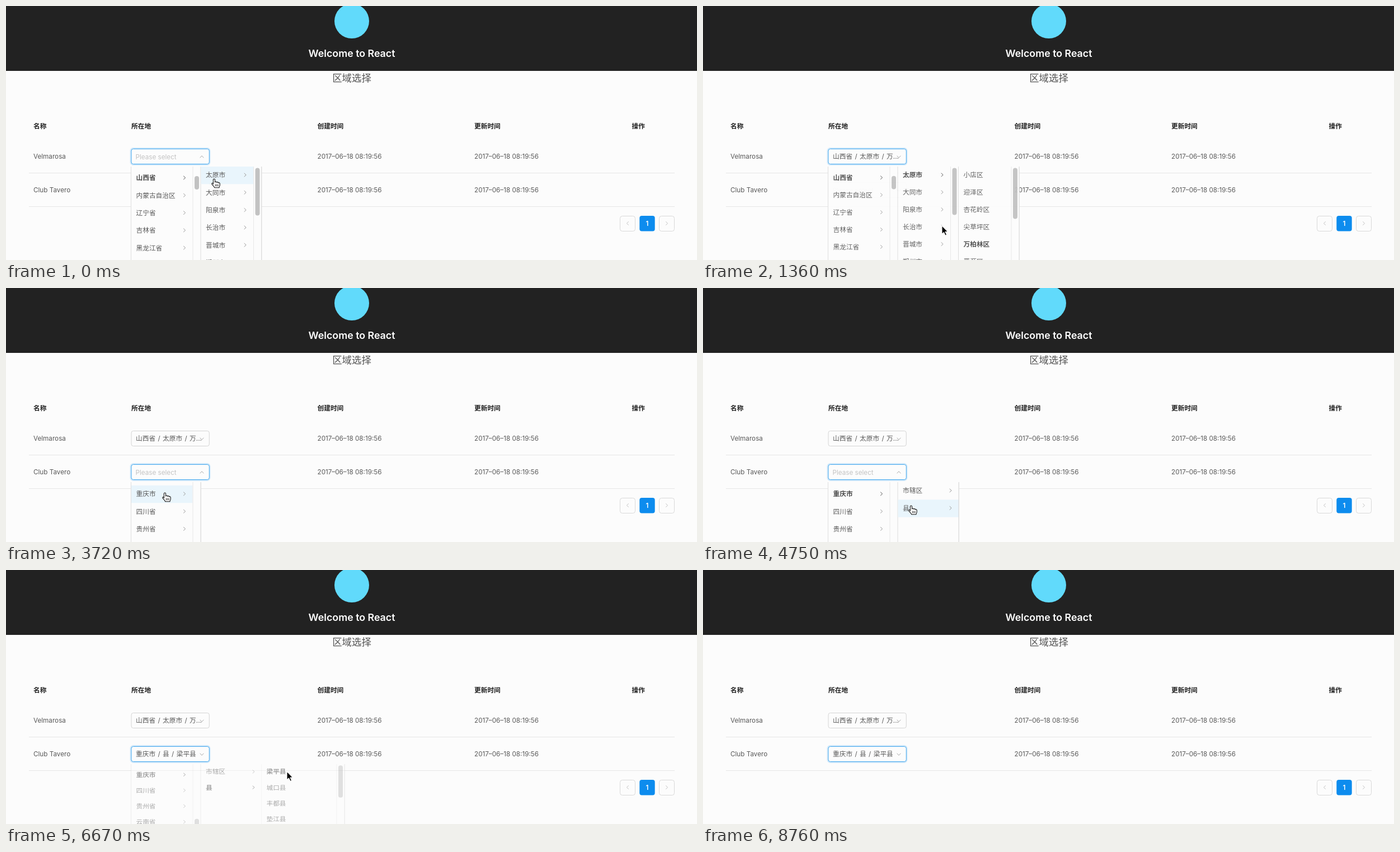
An HTML page for the animation above (8860 ms loop, 1235x454 px).

```html
<!DOCTYPE html>
<html lang="zh">
<head>
<meta charset="utf-8">
<title>区域选择</title>
<style>
  html, body { margin: 0; width: 100%; height: 100%; overflow: hidden; background: #fcfcfc; }
  svg { display: block; width: 1235px; height: 454px; }
  text { font: 11.7px Inter, "Noto Sans CJK SC", "Noto Sans CJK", sans-serif; fill: #595959; white-space: pre; }
  .b { font-weight: 600; fill: #4a4a4a; }
  .th { font-weight: 600; fill: #222; }
  .ph { fill: #c3c3c3; }
  .val { word-spacing: 1.1px; }
</style>
</head>
<body>
<svg viewBox="0 0 1235 454">
  <defs>
    <clipPath id="menuClip"><rect x="220" y="0" width="400" height="188"/></clipPath>
    <g id="arrow">
      <path d="M0 0V15.2L3.5 12L6.1 17.6L8.6 16.5L6.1 11H10.8Z" fill="#000" stroke="#fff" stroke-width="1.1" stroke-linejoin="round"/>
    </g>
    <g id="hand" stroke="#111" stroke-width="1.1" stroke-linejoin="round" stroke-linecap="round">
      <path fill="#fff" d="M-1.6 9.4V1.6C-1.6 -.6 1.5 -.6 1.5 1.6V6C2.2 4.6 4.5 4.7 4.8 6.4C5.5 5.2 7.4 5.5 7.6 7.1C8.4 6.2 10.2 6.7 10.2 8.6V11.2C10.2 13 8.9 13.8 8.9 15.8H.6C.3 13.6 -1.8 12.6 -3.9 9.6C-5 7.8 -3 6.8 -1.6 8.4"/>
      <path d="M2.4 10V13M4.7 10V13M7 10V13" fill="none" stroke-width=".9"/>
    </g>
  </defs>
  <g id="back"></g>
  <g id="page"></g>
  <g id="live"></g>
</svg>
<script>
const LOOP = 8860;
const $ = id => document.getElementById(id);
const clamp = v => Math.max(0, Math.min(1, v));
const ramp = (t, a, b) => clamp((t - a) / (b - a));

const rect = (x, y, w, h, fill, more = '') =>
  `<rect x="${x}" y="${y}" width="${w}" height="${h}" fill="${fill}" ${more}/>`;
const label = (x, y, s, cls = '', more = '') =>
  `<text x="${x}" y="${y}" class="${cls}" ${more}>${s}</text>`;
const stroke = (d, color, w = 1) =>
  `<path d="${d}" fill="none" stroke="${color}" stroke-width="${w}"/>`;
const chevron = (x, y, dir, color) => stroke({
  right: `M${x - 1.8} ${y - 3.2}l3.4 3.2l-3.4 3.2`,
  left: `M${x + 1.8} ${y - 3.2}l-3.4 3.2l3.4 3.2`,
  up: `M${x - 3.3} ${y + 1.8}l3.3 -3.6l3.3 3.6`,
  down: `M${x - 3.3} ${y - 1.8}l3.3 3.6l3.3 -3.6`
}[dir], color);

// The screen refreshes in steps of roughly 150 ms: [step, time] anchors.
const TICKS = [[0, 0], [1, 140], [7, 1060], [15, 2250], [23, 3420], [31, 4610],
  [39, 5780], [47, 6970], [54, 8010], [59, 8760], [60, LOOP]];
const SLACK = 0.08; // steps are uneven by a few ms
function snap(t) {
  const i = TICKS.findIndex(p => p[1] > t);
  const [k0, t0] = TICKS[i - 1], [k1, t1] = TICKS[i];
  const step = (t1 - t0) / (k1 - k0);
  return (t0 + Math.floor((t - t0) / step + SLACK) * step) % LOOP;
}

// Pointer tip: time, x, y
const PATH = [[0, 372, 309], [300, 372, 309], [740, 488, 424], [1210, 484, 424],
  [1360, 426, 392], [1660, 330, 336], [1960, 313, 326], [2690, 313, 326],
  [2980, 287, 367], [3720, 284, 366], [4200, 284, 366], [4640, 372, 389],
  [5200, 372, 389], [5630, 499, 364], [6520, 502, 362], [6670, 502, 360],
  [7110, 502, 360], [7860, 686, 408], [LOOP, 686, 408]];
function pointer(t) {
  t = Math.max(0, t);
  const i = Math.max(1, PATH.findIndex(p => p[0] >= t));
  const a = PATH[i - 1], b = PATH[i], u = ramp(t, a[0], b[0]);
  return { x: a[1] + (b[1] - a[1]) * u, y: a[2] + (b[2] - a[2]) * u };
}

const PICK1 = 300, CLOSE1 = 1244, OPEN2 = 2690, PICK2 = 4200, PICK3 = 5050, CLOSE2 = 6498;
const ITEM = 31.3, THUMB = 0.163;
const list = s => s.split(' ');
const PROVINCES = list('北京市 天津市 河北省 山西省 内蒙古自治区 辽宁省 吉林省 黑龙江省 上海市 江苏省 浙江省 安徽省 福建省 江西省 山东省 河南省 湖北省 湖南省 广东省 广西壮族自治区 海南省 重庆市 四川省 贵州省 云南省 西藏自治区 陕西省 甘肃省');
const SHANXI = list('太原市 大同市 阳泉市 长治市 晋城市 朔州市 晋中市');
const TAIYUAN = list('小店区 迎泽区 杏花岭区 尖草坪区 万柏林区 晋源区 清徐县');
const COUNTIES = list('梁平县 城口县 丰都县 垫江县 武隆县 忠县 开县');

function column(c, top, mouse) {
  const { x, end, items, active, scroll = 0, thumb, leaf } = c;
  const body = thumb ? end - 14.5 : end;
  let out = rect(x, 0, end - x, 188, '#fcfcfc');
  items.forEach((name, i) => {
    const y = i * ITEM - scroll;
    if (y < -ITEM || y > 188) return;
    const over = mouse && mouse.x >= x && mouse.x < body &&
      mouse.y - top >= Math.max(0, y) && mouse.y - top < y + ITEM;
    if (over) out += rect(x, y, body - x, ITEM, '#e9f5fc');
    const on = i === active;
    out += label(x + 8.5, y + 19.4, name, on ? 'b' : '');
    if (!leaf) out += chevron(body - 14.5, y + 15, 'right', on ? '#555' : '#999');
  });
  if (thumb) {
    out += rect(body, 0, 1, 188, '#e8e8e8');
    out += rect(body + 3.5, 2.5 + scroll * THUMB, 8, thumb, '#c2c2c2', 'rx="4"');
  }
  return out + rect(end - .5, 0, 1.4, 188, '#dcdcdc');
}

function menu(top, open, close, cols, t, mouse) {
  if (t < open || t >= close + 200) return '';
  const enter = 1 - (1 - ramp(t, open, open + 200)) ** 5;
  const show = enter * (1 - ramp(t, close, close + 200) ** 5);
  const live = t < close ? mouse : null;
  return `<g transform="translate(0 ${top}) scale(1 ${.8 + .2 * show})" opacity="${show}" clip-path="url(#menuClip)">` +
    cols.map(c => column(c, top, live)).join('') + rect(223, 0, 1, 188, '#dedede') + '</g>';
}

function select(y, value, { focus, hover, open }) {
  const edge = focus || hover ? '#40a5ed' : '#d5d5d5';
  return (focus ? rect(222.5, y - 1, 142, 30, 'none', 'rx="5" stroke="#cfe8fa" stroke-width="2"') : '') +
    rect(224, y + .5, 139.3, 27, '#fcfcfc', `rx="3.5" stroke="${edge}"`) +
    (value ? label(232, y + 18, value, 'val') : label(231.5, y + 18.6, 'Please select', 'ph')) +
    chevron(350, y + 14.5, open ? 'up' : 'down', '#aaa');
}

function drawPage() {
  let out = rect(0, 0, 1235, 116, '#222');
  out += '<circle cx="618" cy="27" r="31" fill="#61dafb"/>';
  out += label(618, 91, 'Welcome to React', '', 'text-anchor="middle" style="font-size:17.8px;font-weight:600;fill:#fff"');
  out += label(618, 135, '区域选择', '', 'text-anchor="middle" style="font-size:17.4px;fill:#555"');
  [[49, '名称'], [224, '所在地'], [556.5, '创建时间'], [837, '更新时间'], [1118.5, '操作']]
    .forEach(([x, s]) => out += label(x, 219.3, s, 'th'));
  [['Velmarosa', 273], ['Club Tavero', 333]].forEach(([name, y]) => {
    out += label(49, y, name);
    [556.5, 837].forEach(x => out += label(x, y, '2017–06–18 08:19:56'));
    out += rect(41, y + 25, 1154, 1, '#e6e6e6');
  });
  [[1097.5, 'left'], [1167.5, 'right']].forEach(([x, dir]) => {
    out += rect(x, 375.5, 27, 27, '#fcfcfc', 'rx="4" stroke="#d9d9d9"');
    out += chevron(x + 13.5, 388.5, dir, '#c4c4c4');
  });
  out += rect(1132.3, 375, 27.4, 27.4, '#0d8cee', 'rx="4"');
  out += label(1146, 393, '1', '', 'text-anchor="middle" style="fill:#fff;font-weight:600"');
  $('page').innerHTML = out;
}

function draw(t) {
  const now = pointer(t), before = pointer(t - 148);
  const settled = Math.hypot(now.x - before.x, now.y - before.y) < 20;
  const mouse = settled ? now : null;

  const glow = ramp(t, 1480, 1780) - ramp(t, 3480, 3680);
  $('back').innerHTML = rect(41, 299, 1154, 59, '#eaf5fc', `opacity="${glow}"`);

  let out = select(255, t >= CLOSE1 && '山西省 / 太原市 / 万...', { focus: t < OPEN2, open: t < CLOSE1 });
  out += select(315, t >= CLOSE2 && '重庆市 / 县 / 梁平县', {
    focus: t >= OPEN2, hover: t >= 1750, open: t >= OPEN2 && t < CLOSE2
  });

  const first = [
    { x: 224, end: 348, items: PROVINCES, active: 3, scroll: 88.9, thumb: 24 },
    { x: 348.5, end: 456.5, items: SHANXI, active: t >= PICK1 ? 0 : -1, thumb: 85 }
  ];
  if (t >= PICK1) first.push({
    x: 457, end: 565, items: TAIYUAN, active: t >= CLOSE1 ? 4 : -1, thumb: 92, leaf: true
  });
  out += menu(287, -999, CLOSE1, first, t, mouse);

  const u = ramp(t, 2950, 3500);
  const second = [{
    x: 224, end: 348, items: PROVINCES, active: t >= PICK2 ? 21 : -1,
    scroll: 651.4 * u * u * (3 - 2 * u), thumb: 24
  }];
  if (t >= PICK2) second.push({ x: 348.5, end: 457, items: ['市辖区', '县'], active: t >= PICK3 ? 1 : -1 });
  if (t >= PICK3) second.push({
    x: 457, end: 605, items: COUNTIES, active: t >= CLOSE2 ? 0 : -1, thumb: 64, leaf: true
  });
  out += menu(347, OPEN2, CLOSE2, second, t, mouse);

  const arrow = (t >= CLOSE1 && t < 1750) || t >= CLOSE2 + 100;
  if (t < 8000) out += `<use href="#${arrow ? 'arrow' : 'hand'}" x="${now.x}" y="${now.y}"/>`;
  $('live').innerHTML = out;
}

drawPage();
const start = performance.now();
let last = -1;
function tick() {
  const t = snap(Math.max(0, performance.now() - start) % LOOP);
  if (t !== last) draw(last = t);
  requestAnimationFrame(tick);
}
tick();
</script>
</body>
</html>
```
